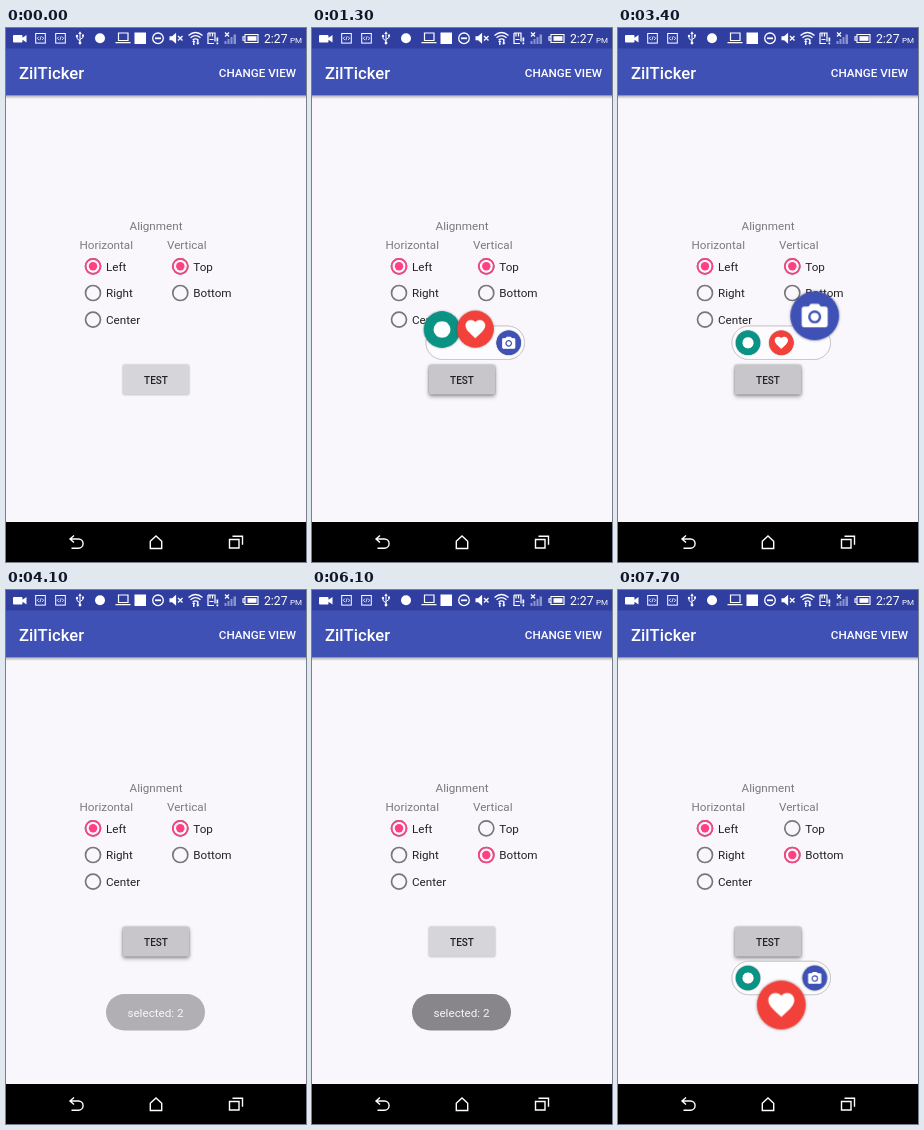
An HTML page that plays this animation: 300x534 px, repeating every 8000 ms.

```html
<!DOCTYPE html>
<html lang="en">
<head>
<meta charset="utf-8">
<title>Slider popup</title>
<style>
  html, body { margin: 0; width: 100%; height: 100%; overflow: hidden; background: #f9f7fb; }
  svg { display: block; width: 100vw; height: 100vh; }
  text { font: 11.67px Roboto, Arial, sans-serif; }
  .medium { font-weight: 500; }
  .line { fill: none; stroke: #fff; }
  .grey { fill: #7a797c; }
  .low { filter: drop-shadow(0 .8px .8px rgba(0,0,0,.35)); }
  .high { filter: drop-shadow(0 2px 2px rgba(0,0,0,.38)); }
  .pill { filter: drop-shadow(0 .7px .6px rgba(0,0,0,.25)); }
</style>
</head>
<body>
<svg viewBox="0 0 300 534">
  <defs>
    <linearGradient id="barShade" x2="0" y2="1">
      <stop stop-color="#000" stop-opacity=".32"/>
      <stop offset="1" stop-color="#000" stop-opacity="0"/>
    </linearGradient>
    <g id="doc">
      <rect class="line" x="-4.8" y="-4.8" width="9.6" height="9.6" stroke-width="1"/>
      <path class="line" stroke-width=".8" d="M-1.6-1.7-3.2 0l1.6 1.7M1.6-1.7 3.2 0 1.6 1.7M.6-2-.6 2"/>
    </g>
    <circle id="dotIcon" r="5.6" fill="#fff"/>
    <path id="heartIcon" fill="#fff" transform="scale(.66) translate(-12 -12.2)" d="M12 21.35l-1.45-1.32C5.4 15.36 2 12.28 2 8.5 2 5.42 4.42 3 7.5 3c1.74 0 3.41.81 4.5 2.09C13.09 3.81 14.76 3 16.5 3 19.58 3 22 5.42 22 8.5c0 3.78-3.4 6.86-8.55 11.54z"/>
    <g id="cameraIcon" transform="scale(.66) translate(-12 -11.2)">
      <path fill="#fff" d="M9 2 7.2 4H4a2 2 0 0 0-2 2v12a2 2 0 0 0 2 2h16a2 2 0 0 0 2-2V6a2 2 0 0 0-2-2h-3.2L15 2z"/>
      <circle cx="12" cy="12" r="4.1" fill="#fff" stroke="#3f51b5" stroke-width="1.8"/>
    </g>
  </defs>

  <rect width="300" height="534" fill="#f9f7fb"/>
  <rect y="67" width="300" height="4" fill="url(#barShade)"/>
  <rect y="20" width="300" height="47.3" fill="#3f51b5"/>
  <rect width="300" height="20.5" fill="#303f9f"/>

  <g id="status" fill="#fff">
    <path d="M8 7h7.5q1 0 1 1v1.8L20.500 7v7.500l-4-2.800V13.500q0 1-1 1H8q-1 0-1-1V8q0-1 1-1z"/>
    <use href="#doc" x="34.500" y="10.300"/>
    <use href="#doc" x="54.500" y="10.300"/>
    <path class="line" stroke-width="1" d="M74 5v10M74 13l-3-2.500V8M74 11.500l3-2V7.500"/>
    <path d="M72.300 6 74 3.200 75.700 6z"/>
    <circle cx="74" cy="15" r="1.400"/><circle cx="71" cy="8" r="1.200"/><path d="M76 6.500h2v2h-2z"/>
    <circle cx="94" cy="10.300" r="5"/>
    <path class="line" stroke-width="1.200" d="M112.500 5h9.500v7.500h-9.500zM109.500 14.700h15"/>
    <rect x="128.500" y="4.500" width="11.500" height="11.500"/>
    <circle class="line" cx="152" cy="10.300" r="5.300" stroke-width="1.300"/>
    <path d="M149 9.400h6v1.800h-6z"/>
    <path d="M163.500 8.300h2.600l4-3.500v11l-4-3.500h-2.600z"/>
    <path class="line" stroke-width="1.300" d="m172 8 4.500 4.500m0-4.500L172 12.500"/>
    <path class="line" stroke-width="1.300" d="M182.500 7.500q7-6 14 0M184.500 9.800q5-4.200 10 0M186.700 12q2.800-2.400 5.600 0"/>
    <path d="m186 14 1.800-2 1.800 2h-1.100v3h-1.400v-3zM190 14.800h1.100v-3h1.400v3h1.100l-1.800 2z"/>
    <path class="line" stroke-width="1.200" d="M202 5h7v8.500M202 5v10.500h6M204 5v3.500M206.500 5v3.500M203.500 11.500h4"/>
    <path d="M210.500 9.500h1.700v4h-1.700zM210.500 14.500h1.700v1.700h-1.700z"/>
    <path fill="#8c95cb" d="M218.500 13h2v3h-2zM221.500 11h2v5h-2zM224.500 9h2v7h-2zM227.500 6.500h2.500v9.500h-2.500z"/>
    <path class="line" stroke-width="1.200" d="m219 4.500 4 4m0-4-4 4"/>
    <path class="line" stroke-width="1.100" d="M239 6.500h13v8h-13zM239 8.800h-2v3.400h2"/>
    <path d="M241.500 8.200h9v4.600h-9z"/>
    <text x="258" y="14.800" style="font-size:12.200px">2:27</text>
    <text x="284" y="14.800" style="font-size:8px">PM</text>
  </g>

  <g fill="#fff" class="medium">
    <text x="13" y="50.500" style="font-size:16.670px;font-weight:500">ZilTicker</text>
    <text x="290" y="48.500" text-anchor="end" style="font-weight:500">CHANGE VIEW</text>
  </g>

  <g class="grey">
    <text x="150" y="202" text-anchor="middle">Alignment</text>
    <text x="73.500" y="221">Horizontal</text>
    <text x="161" y="221">Vertical</text>
  </g>
  <g id="radios"></g>

  <rect class="low" x="117" y="337" width="66" height="29.500" rx="1.500" fill="#d6d5d9"/>
  <rect class="high" id="pressed" x="117" y="337" width="66" height="29.500" rx="1.500" fill="#c8c6ca"/>
  <text class="medium" x="150" y="355.500" text-anchor="middle" fill="#222" style="font-size:10px;font-weight:500">TEST</text>

  <g id="toast">
    <rect x="100" y="404" width="99" height="36.500" rx="18.250" fill="#646266"/>
    <text x="149.500" y="427" text-anchor="middle" fill="#f4f4f4">selected: 2</text>
  </g>
  <g id="popups"></g>

  <rect y="494" width="300" height="40" fill="#000"/>
  <g class="line" stroke-width="1.400">
    <path d="M68 507.500 64 511l4 3.500M64 511h8.500a4.600 4.600 0 0 1 0 9.200H65.500"/>
    <path d="M144.300 513.300 150 508l5.700 5.300v7.200h-11.400z"/>
    <path d="M223.500 511.500h9.500v8.500h-9.500zM226.500 508.300h10v8.500"/>
  </g>
</svg>

<script>
const LOOP = 8000;
const byId = id => document.getElementById(id);

// steps: [time, value] pairs; the first and last values hold to the loop's ends
function play(el, steps, style, easing = 'linear') {
  const all = [[0, steps[0][1]], ...steps, [LOOP, steps[steps.length - 1][1]]];
  el.animate(
    all.map(([time, value]) => ({ offset: time / LOOP, easing, ...style(value) })),
    { duration: LOOP, iterations: Infinity }
  );
}
const opacity = value => ({ opacity: value });

function addGroup(parent, markup) {
  const group = document.createElementNS('http://www.w3.org/2000/svg', 'g');
  group.innerHTML = markup;
  parent.append(group);
  return group;
}

function addRadio(x, y, label, steps) {
  const ring = color => `<circle cx="${x}" cy="${y}" r="7.500" fill="none" stroke="${color}" stroke-width="1.700"/>`;
  const group = addGroup(byId('radios'), `
    ${ring('#777679')}
    <g>${ring('#ff4081')}<circle cx="${x}" cy="${y}" r="4.200" fill="#ff4081"/></g>
    <text x="${x + 13}" y="${y + 4.2}" fill="#222">${label}</text>`);
  play(group.querySelector('g'), steps, opacity);
}

const BUBBLES = [
  { x: 130, color: '#0a9385', icon: 'dotIcon' },
  { x: 163.3, color: '#f1413a', icon: 'heartIcon' },
  { x: 196.7, color: '#3f51b5', icon: 'cameraIcon' }
];

// side: -1 lifts the active bubble above the pill, 1 drops it below
function addPopup(y, side, fade, growth) {
  const popup = addGroup(byId('popups'),
    `<rect class="pill" x="114" y="${y - 16.7}" width="98.500" height="33.400" rx="16.700"
       fill="#fcfbfe" stroke="#c4c3c8" stroke-width=".8"/>`);
  play(popup, fade, opacity);
  BUBBLES.forEach(({ x, color, icon }, i) => {
    const bubble = addGroup(popup,
      `<circle class="low" r="12.400" fill="${color}"/><use href="#${icon}"/>`);
    play(bubble, growth[i], grow => ({
      transform: `translate(${x}px, ${y + side * 27 * grow}px) scale(${1 + 0.97 * grow})`
    }), 'ease-in-out');
  });
}

const ON = [[0, 1]], OFF = [[0, 0]];
addRadio(87, 238.3, 'Left', ON);
addRadio(87, 265, 'Right', OFF);
addRadio(87, 291.6, 'Center', OFF);
addRadio(174.3, 238.3, 'Top', [[4690, 1], [4800, 0]]);
addRadio(174.3, 265, 'Bottom', [[4690, 0], [4800, 1]]);

play(byId('pressed'), [[300, 0], [500, 1], [4200, 1], [4600, 0], [6300, 0], [6500, 1]], opacity);
play(byId('toast'), [[3880, 0], [4340, 1], [6000, 1], [6420, 0]], opacity);

addPopup(314.8, -1, [[680, 0], [820, 1], [3400, 1], [3700, 0]], [
  [[850, 0], [1090, 1], [1180, 1], [1420, 0]],
  [[1180, 0], [1420, 1], [2420, 1], [2700, 0]],
  [[2420, 0], [2700, 1]]
]);
addPopup(388, 1, [[6550, 0], [6700, 1]], [
  [[6820, 0], [7000, 1], [7440, 1], [7690, 0]],
  [[7440, 0], [7690, 1]],
  OFF
]);
</script>
</body>
</html>
```
